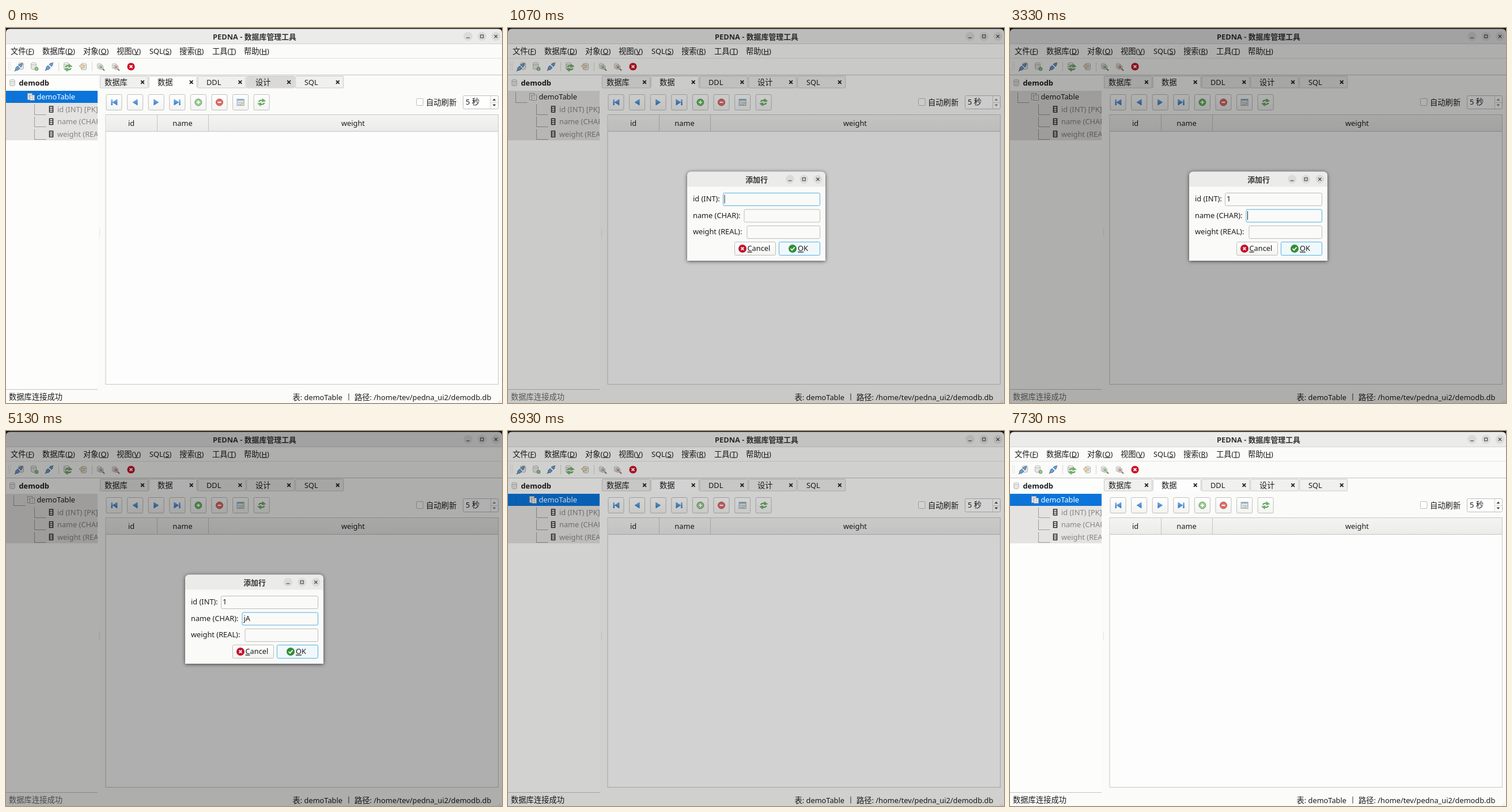
Recreate the animation shown at these times as an HTML page. Size 861x651 px, loop 7.8 s.

```html
<!DOCTYPE html>
<html lang="zh">
<head>
<meta charset="utf-8">
<style>
html, body { margin: 0; width: 100%; height: 100%; overflow: hidden; background: #fbfbfa; }
svg { display: block; width: 861px; height: 651px; }
text { font: 12.8px "Noto Sans", "Noto Sans CJK SC", "Noto Sans CJK", sans-serif; fill: #1c1c1c; white-space: pre; }
.cjk { font-size: 13.3px; font-family: "Noto Sans CJK SC", "Noto Sans CJK", "Noto Sans", sans-serif; }
.bold { font-weight: bold; }
.bold .cjk { font-size: 12.9px; }
.title { fill: #333; }
.mid { text-anchor: middle; }
.gray { fill: #858585; }
.u { text-decoration: underline; }
#dialog { filter: drop-shadow(0 1px 3px rgba(0,0,0,.65)); }
.idle #status { fill: #6c6c6c; }
.idle #spin path { fill: #8b8b8b; }
.idle #add circle { fill: #62b95a; }
</style>
</head>
<body>
<svg id="stage" viewBox="0 0 861 651">
  <defs>
    <linearGradient id="btn" x2="0" y2="1"><stop stop-color="#fff"/><stop offset="1" stop-color="#f3f3f2"/></linearGradient>
    <linearGradient id="head" x2="0" y2="1"><stop stop-color="#f4f4f3"/><stop offset="1" stop-color="#ebebea"/></linearGradient>
    <linearGradient id="blue" x2="0" y2="1"><stop stop-color="#7db6ee"/><stop offset="1" stop-color="#2a74c6"/></linearGradient>
    <clipPath id="tree"><path d="M0 82H159V627H0Z"/></clipPath>
  </defs>
  <g id="window"></g>
  <rect id="dim" width="861" height="651" opacity="0"/>
  <g id="dialog"></g>
</svg>
<script>
const $ = id => document.getElementById(id);

// ---- markup helpers ----
const rect = (x, y, w, h, fill, stroke = 'none', more = '') =>
  `<rect x="${x}" y="${y}" width="${w}" height="${h}" fill="${fill}" stroke="${stroke}" ${more}/>`;
const path = (d, stroke, width = 1, fill = 'none', more = '') =>
  `<path d="${d}" stroke="${stroke}" stroke-width="${width}" fill="${fill}" ${more}/>`;
const circle = (x, y, r, fill, more = '') => `<circle cx="${x}" cy="${y}" r="${r}" fill="${fill}" ${more}/>`;
const group = (x, y, body) => `<g transform="translate(${x} ${y})">${body}</g>`;
// An ampersand before a letter marks the underlined access key.
const text = (x, y, s, cls = '', more = '') => {
  const body = s.replace(/[\u4e00-\u9fff]+/g, '<tspan class="cjk">$&</tspan>')
    .replace(/&(\w)/g, '<tspan class="u">$1</tspan>');
  return `<text x="${x}" y="${y}" class="${cls}" ${more}>${body}</text>`;
};
const cross = (x, y, r, color, width) =>
  path(`M${x - r} ${y - r}l${2 * r} ${2 * r}m0 ${-2 * r}l${-2 * r} ${2 * r}`, color, width);
const line = (d, color = '#c4c4c2') => path(d, color);
const dots = d => path(d, '#555', 1, 'none', 'stroke-dasharray="1 1"');

const windowButtons = (x, y, r) =>
  [0, 1, 2].map(i => circle(x + 24.2 * i, y, r, '#dcdbda')).join('') +
  path(`M${x - 3} ${y + 2.5}h6`, '#333') +
  rect(x + 21.7, y - 2.5, 5, 5, 'none', '#333') +
  cross(x + 48.4, y, 2.6, '#333', 1.1);

const cylinder = (x, y, s = 1) => `<g transform="translate(${x} ${y}) scale(${s})">` +
  path('M-4.5 -4V4C-4.5 6.5 4.5 6.5 4.5 4V-4', '#a5a5a3', .8, '#e6e6e4') +
  `<ellipse cy="-4" rx="4.5" ry="1.8" fill="#f6f6f5" stroke="#a5a5a3" stroke-width=".8"/></g>`;
const plug = (x, y) => group(x, y,
  path('M-7 7l4 -4M3 -3l4 -4', '#555', 1.2) +
  path('M-5 1l3 -3 4 4 -3 3q-3 1 -4 0t0 -4zM0 -4l3 -2q3 -1 3 3l-2 3z', '#2f5f92', .8, '#6b9fd2'));
const lens = (x, y, color) => cylinder(x - 2, y - 1, .8) +
  path(`M${x + 3} ${y + 3}l4 4`, '#8a7660', 2) +
  circle(x + 1, y + 1, 3.8, '#e3ece6', 'stroke="#999" stroke-width=".9"') + circle(x + 1, y + 1, 2.1, color);
const arrows = (x, y) => group(x, y,
  path('M-5 -1Q-3 -4.5 2 -3.2M5 1Q3 4.5 -2 3.2', '#58a052', 2) +
  path('M1.5 -6.5L7 -2.2 1 -.5ZM-1.5 6.5L-7 2.2 -1 .5Z', '#468a41', .5, '#74b86d'));

function frameAndMenu() {
  const menus = [[8, '文件(&F)'], [63, '数据库(&D)'], [134, '对象(&O)'], [192, '视图(&V)'],
    [249, 'SQL(&S)'], [301, '搜索(&R)'], [358, '工具(&T)'], [413, '帮助(&H)']];
  return rect(0, 0, 861, 651, '#fbfbfa') + rect(0, 0, 861, 8, '#161616') +
    path('M0 28V8Q0 1.5 7 1.5H854Q861 1.5 861 8V28Z', 'none', 0, '#ebebea') +
    line('M0 27.5H861', '#d4d3d2') +
    text(431.5, 19.8, 'PEDNA - 数据库管理工具', 'bold mid title') + windowButtons(802, 14.5, 7.8) +
    menus.map(([x, s]) => text(x, 44.5, s)).join('') +
    line('M0 52.5H861', '#e2e2e0') + line('M0 81.5H861', '#c2c2c0');
}

function toolbar() {
  return path('M4.5 60V75M7.5 60V75', '#bbb', 1, 'none', 'stroke-dasharray="1 2"') +
    line('M91.5 59V75M149.5 59V75', '#d5d5d3') +
    cylinder(26, 66) + plug(22, 68) +
    cylinder(48, 66) + circle(53, 71, 3, '#9cc592', 'stroke="#5d9155" stroke-width=".9"') +
    plug(75, 67) +
    cylinder(105, 66) + arrows(108, 69) +
    cylinder(135, 67) + path('M127 66l5 -4v2h4v5h-4v2z', '#b09a70', .7, '#e4d5b0') +
    lens(164, 67, '#6bb063') + lens(190, 67, '#d26a63') +
    circle(217, 67, 6.6, '#cc1026') + cross(217, 67, 2.4, '#fff', 1.9);
}

function sidebar() {
  const fields = ['id (INT) [PK]', 'name (CHAR)', 'weight (REAL)'];
  return rect(0, 82, 159, 545, '#fdfdfc') + line('M0 627.5H159') +
    `<g clip-path="url(#tree)">` + cylinder(11, 95, .95) + text(22.5, 99.5, 'demodb', 'bold') +
    rect(0, 109, 159, 86, '#e4e3e2') + rect(0, 109, 159, 21, '#0a74da', 'none', 'id="select"') +
    dots('M13.5 112V129.5H34') +
    rect(37.5, 113.5, 8, 11, '#eee', '#999') + rect(41.5, 116.5, 8, 9, '#fff', '#999') +
    path('M42 119.5H49M42 122.5H49M45.5 117V125', '#aaa', .8) + path('M39 116.5H42M39 119.5H41', '#6d9dd0') +
    text(53.5, 124, 'demoTable', '', 'id="table"') +
    fields.map((s, i) => {
      const y = 141 + 21.5 * i, top = Math.floor(y);
      return dots(`M49.5 ${top - 8}V${top + 9.5}H70`) +
        rect(75.5, y - 5, 6, 10, '#fff', '#222', 'stroke-width="1.5"') +
        path(`M76 ${y - 1.7}h5M76 ${y + 1.7}h5`, '#222', 1.3) +
        text(89, y + 4.5, s, 'gray');
    }).join('') + '</g>' +
    path('M162.5 349V364', '#bbb', 1, 'none', 'stroke-dasharray="1 2"');
}

function tabs() {
  const names = [[171, '数据库'], [263, '数据'], [348, 'DDL'], [433, '设计'], [518, 'SQL']];
  return names.map(([x, s], i) => {
    const left = 163.5 + 84.8 * i, on = i == 1;
    return rect(left, 83.5, 83, 20.5, on ? '#fdfdfd' : '#f0f0ef', '#c9c9c7', 'rx="1"') +
      (i == 3 ? rect(left + .5, 84, 82, 19.5, '#dad9d8', 'none', 'id="hover"') : '') +
      (on ? rect(left + .5, 102, 82, 3, '#fdfdfd') : '') +
      text(x, 98.6, s) + cross(237 + 84.7 * i, 94, 2.8, '#222', 1.9);
  }).join('');
}

function dataTools() {
  const prev = 'M4 -5V5L-4 0Z', next = 'M-4 -5V5L4 0Z';
  const arrow = (x, d) => group(x, 129, path(d, '#3a78bd', .6, 'url(#blue)'));
  const bar = x => rect(x, 124, 2.4, 10, 'url(#blue)');
  const mid = i => 187.5 + 36.6 * i;
  let out = '';
  for (let i = 0; i < 8; i++) out += rect(mid(i) - 13.5, 115.5, 27, 27, 'url(#btn)', '#bfbfbd', 'rx="2"');
  return out + bar(mid(0) - 5) + arrow(mid(0) + 1.5, prev) + arrow(mid(1), prev) +
    arrow(mid(2), next) + arrow(mid(3) - 1.5, next) + bar(mid(3) + 3) +
    `<g id="add">${circle(mid(4), 129, 6, '#9cc792', 'stroke="#66a35d"')}</g>` +
    path(`M${mid(4) - 3} 129h6m-3 -3v6`, '#fff', 2) +
    circle(mid(5), 129, 6, '#de6a64', 'stroke="#bd5a54"') + path(`M${mid(5) - 3} 129h6`, '#fff', 2.2) +
    rect(mid(6) - 6, 123.5, 12, 11, '#dbe7ee', '#98a3ae') + rect(mid(6) - 6, 123.5, 12, 2.5, '#8fb1d0') +
    path(`M${mid(6) - 4} 129.5h6M${mid(6) - 4} 132.5h4`, '#a3b8ca') + path(`M${mid(6)} 134l5 -5`, '#dcc27a', 2) +
    arrows(mid(7), 129) +
    rect(712.5, 122.5, 11.5, 12, '#fff', '#bdbdbb', 'rx="1"') + text(729, 133.5, '自动刷新') +
    rect(793.5, 117.5, 61, 23, '#fff', '#bdbdbb', 'rx="2"') + text(798, 132.7, '5 秒') +
    line('M841.5 118V140M842 129.5H854', '#d3d3d1') +
    `<g id="spin">${path('M844.5 126l3 -3.5 3 3.5zM844.5 132.5l3 3.5 3 -3.5z', 'none', 0, '#444')}</g>`;
}

function tableAndStatus() {
  return rect(173, 150.5, 681.5, 468, '#fdfdfd', '#c6c6c4') + rect(173.5, 151, 680.5, 28, 'url(#head)') +
    line('M173 179.5H854M262.5 151V179M351.5 151V179') +
    [[217.5, 'id'], [306.5, 'name'], [602.5, 'weight']].map(([x, s]) => text(x, 169.7, s, 'mid')).join('') +
    text(5, 645, '数据库连接成功', '', 'id="status"') +
    text(497.5, 645.7, '表: demoTable') + line('M595 634.5V646.5', '#333') +
    text(605, 645.7, '路径: /home/tev/pedna_ui2/demodb.db') +
    path('M854 649.5H859M857 646.5H859', '#bbb', 1, 'none', 'stroke-dasharray="1 1"');
}

function dialog() {
  const field = (id, x, y, label) => text(321, y + 15.3, label) +
    rect(x + .5, y + .5, 541 - x, 22, '#fafaf9', '#bdbdbb', `rx="2" id="${id}"`) +
    text(x + 3, y + 15.3, '', '', `id="${id}Text"`);
  return path('M311 404V257Q311 249.5 318 249.5H544Q551 249.5 551 257V404Z', 'none', 0, '#fafaf9') +
    path('M311 275.5V257Q311 249.5 318 249.5H544Q551 249.5 551 257V275.5Z', 'none', 0, '#ebebea') +
    text(431.5, 267.8, '添加行', 'bold mid title') + windowButtons(489.5, 262.5, 7.5) +
    '<g id="form">' +
    field('id', 373, 286, 'id (INT):') + field('name', 409.5, 314.5, 'name (CHAR):') +
    field('weight', 414.5, 343, 'weight (REAL):') +
    rect(375.5, 289.5, 1, 15, '#222', 'none', 'id="caret"') +
    rect(393.5, 371.5, 71, 23, 'url(#btn)', '#bdbdbb', 'rx="2"') +
    circle(407, 383, 7, '#c2142c') + cross(407, 383, 2.3, '#fff', 1.8) + text(415.5, 387.3, '&Cancel') +
    rect(470.5, 371.5, 71, 23, '#f0f8fc', '#55b2e2', 'rx="2"') +
    circle(494, 383, 7, '#2f8f35') + path('M490.5 383l2.5 2.6 4.5 -5', '#fff', 1.8) + text(503, 387.3, '&OK') +
    '</g>';
}

$('window').innerHTML = frameAndMenu() + toolbar() + sidebar() + tabs() + dataTools() + tableAndStatus();
$('dialog').innerHTML = dialog();

// ---- timeline (ms) ----
const LOOP = 7800, STEP = 1000 / 15, OPEN = 745, CLOSE = 6828;
const typed = [[0, ''], [4330, 'j'], [5130, 'jA'], [5200, 'j'], [5330, ''],
  [5730, 'J'], [6070, 'Ja'], [6200, 'Jac'], [6270, 'Jack']];
const clamp = v => Math.max(0, Math.min(1, v));
const easeOut = v => 1 - (1 - clamp(v)) ** 2;

function caretOn(t) {
  if (t < 2730) return Math.floor((t - 725) / 600) % 2 == 0;
  return t < 3930;
}

function draw(now) {
  const t = Math.floor((now % LOOP + 4) / STEP) * STEP + 4;
  const open = t >= OPEN && t < CLOSE, inName = t >= 3330;

  $('hover').setAttribute('opacity', t < 268 ? 1 : t < 330 ? .5 : 0);
  $('stage').classList.toggle('idle', open);
  $('select').style.display = open ? 'none' : '';
  $('table').style.fill = open ? '' : '#fff';
  $('dim').setAttribute('opacity', .31 * (open ? clamp((t - OPEN) / 500) : t < OPEN ? 0 : 1 - clamp((t - CLOSE) / 250)));

  const scale = t < CLOSE ? easeOut((t - OPEN) / 100) : 1 - easeOut((t - CLOSE) / 104);
  $('dialog').style.display = scale > 0 ? '' : 'none';
  $('dialog').setAttribute('transform', `translate(0 ${328 * (1 - scale)}) scale(1 ${scale})`);
  $('form').style.display = open ? '' : 'none';

  $('id').setAttribute('stroke', inName ? '#bdbdbb' : '#55b2e2');
  $('name').setAttribute('stroke', inName ? '#55b2e2' : '#bdbdbb');
  $('idText').textContent = t >= 2730 ? '1' : '';
  $('nameText').textContent = typed.filter(([at]) => t >= at).pop()[1];
  const caret = $('caret');
  caret.style.display = caretOn(t) ? '' : 'none';
  caret.setAttribute('x', inName ? 412 : t >= 2730 ? 384 : 375.5);
  caret.setAttribute('y', inName ? 318 : 289.5);
}

const start = performance.now();
(function tick() {
  draw(performance.now() - start);
  requestAnimationFrame(tick);
})();
</script>
</body>
</html>
```
